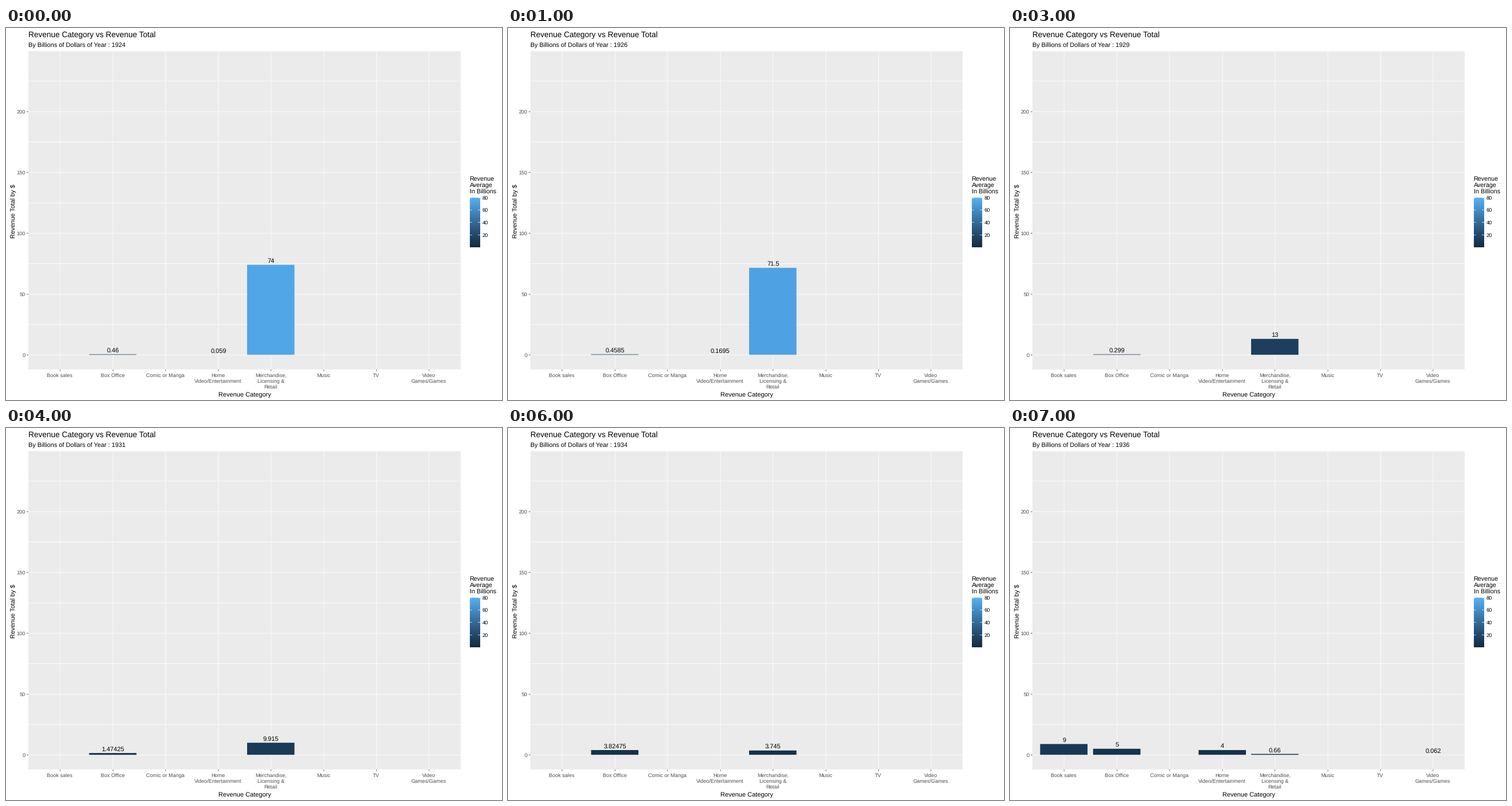
A matplotlib script for the animation above (8000 ms loop, 864 px wide and 648 px high).

```python
import matplotlib.pyplot as plt
import numpy as np
from matplotlib.animation import FuncAnimation
from matplotlib.patches import Rectangle

plt.rcParams["font.family"] = "Liberation Sans"
plt.rcParams["text.hinting"] = "none"

W, H, DPI = 864, 648, 72          # at 72 dpi one point is one pixel

# Shapes sit on a whole-number grid whose cells are 3/4 pixel wide;
# text is placed in pixels.
CELL = 0.75
LEFT, TOP, RIGHT, BOTTOM = 52, 54, 1056, 793
ZERO, UNIT = 759.65, 2.8267       # row of value 0, rows per unit
CENTERS = [125.8 + 122.45 * i for i in range(8)]
HALF_BAR = 55.1
BOOK, BOX, COMIC, HOME, MERCH, MUSIC, TV, GAMES = range(8)
NAMES = ["Book sales", "Box Office", "Comic or Manga",
         "Home\nVideo/Entertainment", "Merchandise,\nLicensing &\nRetail",
         "Music", "TV", "Video\nGames/Games"]

# (frame, year, value per category)
KEYS = [
    (0, 1924, {BOX: 0.46, HOME: 0.059, MERCH: 74}),
    (2, 1927, {BOX: 0.457, HOME: 0.28, MERCH: 69}),
    (3, 1929, {BOX: 0.299, MERCH: 13}),
    (7, 1936, {BOOK: 9, BOX: 5, HOME: 4, MERCH: 0.66, GAMES: 0.062}),
]

# Colour scale: dark to light blue, blended in CIE Lab
TO_XYZ = np.array([[0.4124, 0.3576, 0.1805],
                   [0.2126, 0.7152, 0.0722],
                   [0.0193, 0.1192, 0.9505]])
WHITE = TO_XYZ.sum(axis=1)


def to_lab(rgb):
    c = np.array(rgb) / 255
    lin = np.where(c > 0.04045, ((c + 0.055) / 1.055) ** 2.4, c / 12.92)
    t = TO_XYZ @ lin / WHITE
    f = np.where(t > 0.008856, np.cbrt(t), 7.787 * t + 16 / 116)
    return np.array([116 * f[1] - 16, 500 * (f[0] - f[1]), 200 * (f[1] - f[2])])


def to_rgb(lab):
    fy = (lab[0] + 16) / 116
    f = np.array([fy + lab[1] / 500, fy, fy - lab[2] / 200])
    t = np.where(f > 0.2069, f ** 3, (f - 16 / 116) / 7.787)
    lin = np.clip(np.linalg.inv(TO_XYZ) @ (t * WHITE), 0, 1)
    c = np.where(lin > 0.0031308, 1.055 * lin ** (1 / 2.4) - 0.055, 12.92 * lin)
    return np.clip(c, 0, 1)


DARK, LIGHT = to_lab((19, 43, 67)), to_lab((86, 177, 247))


def shade(value):
    t = min(max(value / 80, 0), 1)
    return to_rgb(DARK + (LIGHT - DARK) * t)


fig = plt.figure(figsize=(W / DPI, H / DPI), dpi=DPI, facecolor="white")
ax = fig.add_axes([0, 0, 1, 1])
ax.set_xlim(0, W)
ax.set_ylim(H, 0)
ax.axis("off")


def rect(x0, y0, x1, y1, color, z=1):
    """Filled box; corners in grid cells."""
    box = Rectangle((x0 * CELL, y0 * CELL), (x1 - x0) * CELL, (y1 - y0) * CELL,
                    facecolor=color, linewidth=0, snap=False, zorder=z)
    return ax.add_patch(box)


def text(x, y, s, size, color="black", ha="left", **kw):
    """Text on a baseline; position and size in pixels."""
    return ax.text(x, y, s, fontsize=size, color=color, ha=ha,
                   va="baseline", zorder=5, **kw)


def draw_panel():
    rect(LEFT, TOP, RIGHT, BOTTOM, "#EBEBEB")
    for v in range(0, 250, 25):
        y = int(ZERO - UNIT * v)
        rect(LEFT, y, RIGHT, y + 1, "white", 2)
        if v % 50 == 0:
            rect(LEFT - 4, y, LEFT, y + 1, "#333333", 2)
            text(34, y * CELL + 3.8, str(v), 9.2, "#4D4D4D", "right")
    for cx, name in zip(CENTERS, NAMES):
        x = int(cx)
        rect(x, TOP, x + 1, BOTTOM, "white", 2)
        rect(x, BOTTOM, x + 1, BOTTOM + 4, "#333333", 2)
        for row, line in enumerate(name.split("\n")):
            text(x * CELL, 608 + 10 * row, line, 9.15, "#4D4D4D", "center")
    text(39, 16.2, "Revenue Category vs Revenue Total", 13.6)
    text(415.5, 641.4, "Revenue Category", 11, ha="center")
    text(16, 366, "Revenue Total by $", 11, rotation=90,
         rotation_mode="anchor")


def draw_legend():
    x0, x1, y0, y1 = 1078, 1101, 394, 509
    for y, line in zip((266, 277, 289), ("Revenue", "Average", "In Billions")):
        text(807.5, y, line, 10.8)
    # Each strip reaches the bottom, so no seams show between them
    for y, v in zip(range(y0, y1), np.linspace(80, 0, y1 - y0)):
        rect(x0, y, x1, y1, shade(v), 2)
    for v in (80, 60, 40, 20):
        y = int(y0 + (80 - v) * 1.44)
        rect(x0, y, x0 + 4, y + 1, "white", 3)
        rect(x1 - 5, y, x1, y + 1, "white", 3)
        text(830, y * CELL + 3.8, str(v), 9.3)


draw_panel()
draw_legend()
subtitle = text(39, 33.8, "", 10.9)
bars = [rect(int(c - HALF_BAR), 0, int(c + HALF_BAR), 0, "white", 3)
        for c in CENTERS]
labels = [text(c * CELL, 0, "", 11, ha="center") for c in CENTERS]


def state(frame):
    """Year and values, blended linearly between neighbouring keys."""
    for (fa, ya, a), (fb, yb, b) in zip(KEYS, KEYS[1:]):
        if frame == fa:
            return ya, a
        if fa < frame < fb:
            t = (frame - fa) / (fb - fa)
            mix = {k: a[k] + (b[k] - a[k]) * t for k in a if k in b}
            return round(ya + (yb - ya) * t), mix
    return KEYS[-1][1:]


def update(frame):
    year, values = state(frame)
    subtitle.set_text(f"By Billions of Dollars of Year : {year}")
    for i, (bar, label) in enumerate(zip(bars, labels)):
        shown = i in values
        bar.set_visible(shown)
        label.set_visible(shown)
        if not shown:
            continue
        v = values[i]
        y = ZERO - UNIT * v
        bar.set_y(int(y) * CELL)
        bar.set_height((int(ZERO) - int(y)) * CELL)
        bar.set_facecolor(shade(v))
        label.set_text(f"{v:.6g}")
        label.set_y(y * CELL - 3.8)
    return [subtitle, *bars, *labels]


anim = FuncAnimation(fig, update, frames=8, interval=1000, repeat=True,
                     repeat_delay=0, blit=False)
plt.show()
```
